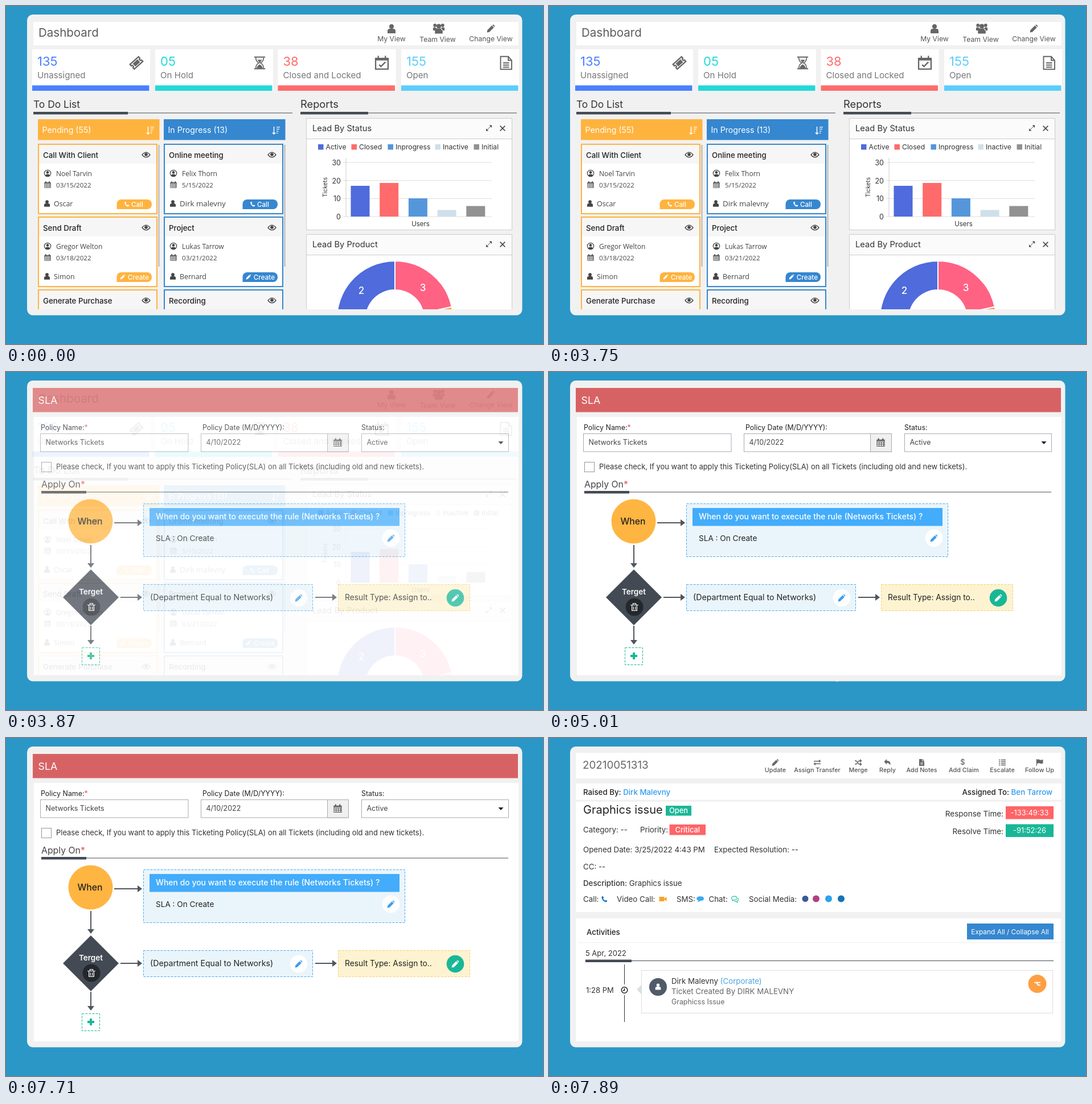
These frames come from a looping animation (943x594 px, 8 s). An HTML page:

```html
<!DOCTYPE html>
<html lang="en">
<head>
<meta charset="utf-8">
<title>Help desk tour</title>
<style>
html, body { margin: 0; width: 100%; height: 100%; overflow: hidden; background: #2a97c7; }
svg { display: block; width: 943px; height: 594px; font-family: Inter, sans-serif; }
text { white-space: pre; }
</style>
</head>
<body>
<svg id="stage" viewBox="0 0 943 594"></svg>
<script>
const DARK = '#434a54', ORANGE = '#ffb33f', BLUE = '#3587d0', GREEN = '#19b797', RED = '#ff6467', GREY = '#666';

const rect = (x, y, w, h, fill, more = '') => `<rect x="${x}" y="${y}" width="${w}" height="${h}" fill="${fill}" ${more}/>`;
const box = (x, y, w, h, fill, stroke, more = '') => rect(x, y, w, h, fill, `stroke="${stroke}" ${more}`);
const circle = (x, y, r, fill) => `<circle cx="${x}" cy="${y}" r="${r}" fill="${fill}"/>`;
const path = (d, fill, more = '') => `<path d="${d}" fill="${fill}" ${more}/>`;
const line = (d, color, width = 1) => path(d, 'none', `stroke="${color}" stroke-width="${width}"`);
const text = (x, y, size, str, fill = '#333', weight = 400, anchor = 'start', more = '') =>
  `<text x="${x}" y="${y}" font-size="${size}" fill="${fill}" font-weight="${weight}" text-anchor="${anchor}" ${more}>${str}</text>`;
const mid = (x, y, size, str, fill, weight) => text(x, y, size, str, fill, weight, 'middle');
const tint = (str, fill) => `<tspan fill="${fill}">${str}</tspan>`;

// Icons live in a box from -8 to 8; F fills, S strokes in the current colour.
const F = d => path(d, 'currentColor');
const S = (d, w = 1.5) => line(d, 'currentColor', w);
const dot = (x, y, r) => circle(x, y, r, 'currentColor');
const ICONS = {
  user: dot(0, -4, 4) + F('M-7 8V4Q-7 0-3 0H3Q7 0 7 4V8Z'),
  face: S('M-7 0A7 7 0 1 1 7 0A7 7 0 1 1-7 0') + dot(0, -2, 2.8) + F('M-5 5Q-4 1 0 2Q4 1 5 5Q0 9-5 5'),
  team: dot(-6, -5, 2.6) + dot(6, -5, 2.6) + dot(0, -3.5, 3.6) +
    F('M-9 3V0Q-9-2-6-2L-3 0L-5 3ZM9 3V0Q9-2 6-2L3 0L5 3ZM-6 8V4Q-6 0-2 0H2Q6 0 6 4V8Z'),
  pencil: F('M-8 8L-7 3L2-6L6-2L-3 7ZM3-7L5-8L8-5L7-3Z'),
  eye: S('M-8 0Q0-10 8 0Q0 10-8 0Z') + dot(0, -.5, 3.2),
  cal: S('M-7-5H7V7H-7ZM-7-1H7M-7 3H7M-3-2V7M1-2V7M5-2V7', 1.1) + S('M-7-4H7M-4-8V-4M4-8V-4', 2),
  check: S('M-7-5H7V7H-7ZM-4-8V-4M4-8V-4M-3 2L-1 4L4-1') + S('M-7-4H7', 2.5),
  phone: F('M-7-5L-4-8L-1-3L-3-1Q-1 3 2 4L4 2L8 5L5 8Q-5 7-7-5'),
  sort: S('M-4-8V7M-7 4L-4 7L-1 4M1-7H8M1-3H7M1 1H5M1 5H4', 1.7),
  ticket: `<g transform="rotate(-42)">${S('M-9-5H9V-2A2 2 0 0 0 9 2V5H-9V2A2 2 0 0 0-9-2Z', 2)}${F('M-5-3H5V3H-5Z')}</g>`,
  glass: S('M-7-7.5H7M-7 7.5H7') + S('M-5-7Q-5-2-1 0Q-5 2-5 7M5-7Q5-2 1 0Q5 2 5 7', 1.2) + F('M-3-4H3L0 0ZM-4 7Q-3 3 0 2Q3 3 4 7'),
  doc: S('M-6-7.5H3L7-3V7.5H-6ZM3-7V-3H7M-3 0H4M-3 2.5H4M-3 5H4', 1.3),
  note: F('M-6-8H1V-3H6V8H-6ZM2-8L6-4H2Z') + line('M-3 1H3M-3 4H3', '#fff', 1.3),
  expand: S('M-5 5L5-5', 1.5) + F('M-8 8V1L-1 8ZM8-8V-1L1-8Z'),
  close: S('M-7-7L7 7M7-7L-7 7', 2.3),
  trash: S('M-5-4V7H5V-4M-8-4H8M-3-5V-7H3V-5M-2-1V5M2-1V5', 1.4),
  swap: S('M-8-3H5M8 3H-5', 2) + F('M4-7L9-3L4 0ZM-4 0L-9 3L-4 7Z'),
  merge: S('M-8-4H-5L2 4H5M-8 4H-5L2-4H5', 2.2) + F('M4-8L9-4L4 0ZM4 0L9 4L4 8Z'),
  reply: F('M-8-2L-2-8V-4Q9-4 6 7Q5 1-2 1V5Z'),
  list: S('M-8-6H-5M-3-6H8M-8-2H-5M-3-2H8M-8 2H-5M-3 2H8M-8 6H-5M-3 6H8', 2.2),
  flag: S('M-7-8V8', 1.6) + F('M-6-7Q-2-8 1-6Q4-5 8-7V2Q4 4 1 2Q-2 1-6 3Z'),
  video: F('M-8-5H3V-1L8-5V5L3 1V5H-8Z'),
  bubble: F('M-8-1Q-7-6 0-6Q8-6 8-1Q8 4 0 4L-6 7L-4 3Q-8 2-8-1'),
  chat: S('M-7-2Q-6-6-1-6Q5-6 5-2Q5 2-1 2L-5 4L-4 1Q-7 0-7-2M7-2Q10 3 5 4L6 7L2 5H-1', 1.4),
  clock: S('M-7 0A7 7 0 1 1 7 0A7 7 0 1 1-7 0M0-4V1H-4', 2),
  branch: S('M-7-3H7M-2-3L2 3H7', 2.6)
};
const icon = (name, x, y, size, color = GREY) =>
  `<g transform="translate(${x} ${y}) scale(${size / 16})" color="${color}">${ICONS[name]}</g>`;

const heading = (x, y, size, str, thick, end, lineY, color) =>
  text(x, y, size, str, color) + line(`M${x} ${lineY}H${end}`, DARK) + rect(x, lineY - 2, thick, 4.5, DARK);

function dashboard() {
  const tile = (x, count, label, color, name, iconX, iconSize) =>
    rect(x, 76, 207, 73, '#fff') + rect(x, 139.5, 205.5, 9.5, color) + text(x + 9, 105, 22, count, color) +
    text(x + 9, 127, 15.1, label, '#777') + icon(name, iconX, 100, iconSize);

  const card = (x, y, color, title, person, date, owner, action, ownerSize = 12.4) => {
    const small = (dx, dy, size, str) => text(x + dx, y + dy, size, str, '#444', 400, 'start', 'font-family="Open Sans, sans-serif"');
    const right = x + 199, isCall = action == 'Call';
    return box(x, y + 1, 208, 122, '#fff', color, 'stroke-width="2"') + rect(x + 1, y + 2, 206, 33, '#f6f6f6') +
      text(x + 8, y + 25, 13.3, title, '#222', 500) + icon('eye', x + 189, y + 19.5, 14, '#444') +
      icon('face', x + 16, y + 52, 13, '#444') + small(31, 57, 12, person) +
      icon('cal', x + 16, y + 72, 12, '#444') + small(31, 77, 11.6, date) +
      icon('user', x + 15, y + 105, 11.5, '#444') + small(27, 110, ownerSize, owner) +
      path(`M${right - 8} ${y + 98}a8 8 0 0 1 8 8v1a8 8 0 0 1-8 8h-53.5v-9a8 8 0 0 1 8-8z`, color) +
      icon(isCall ? 'phone' : 'pencil', right - (isCall ? 44 : 51), y + 106, 9, '#fff') +
      text(right - (isCall ? 15 : 5), y + 110.5, 11.7, action, '#fff', 500, 'end');
  };

  const column = (x, color, title, cards) =>
    rect(x - 1, 199, 213.5, 36.5, color) + text(x + 6.5, 223, 14.2, title, '#fff') + icon('sort', x + 196, 219, 14, '#fff') +
    cards.map((c, i) => card(x, 242 + 128 * i, color, ...c)).join('') +
    line(`M${x + 211.5} 244V458`, '#b4b4b4', 2);

  const panel = (y, height, title) =>
    box(527.5, y, 361, height, '#fff', '#ccc') + rect(528, y + .5, 360, 35, '#fbfbfb') + line(`M527 ${y + 36}H889`, '#ccc') +
    text(538, y + 22.5, 14.7, title) + icon('expand', 848, y + 17, 10, '#444') + icon('close', 872, y + 17.5, 10, '#444');

  const series = [
    ['Active', 548, '#4f6bdc', 54], ['Closed', 606.5, '#ff6b6b', 59], ['Inprogress', 670.5, '#5596db', 32],
    ['Inactive', 753.5, '#cfe0ea', 11.5], ['Initial', 821.5, '#929292', 18.5]];
  const legend = ([name, x, color]) => rect(x, 243, 9.5, 9.5, color) + text(x + 13.5, 252, 12.2, name);
  const bar = ([, , color, height], i) => rect(605.5 + 50.7 * i, 370 - height, 33, height, color);

  const polar = (r, deg) => {
    const a = deg * Math.PI / 180;
    return `${683 + r * Math.sin(a)} ${550 - r * Math.cos(a)}`;
  };
  const slice = (from, to, color) => path(
    `M${polar(102, from)}A102 102 0 0 1 ${polar(102, to)}L${polar(51, to)}A51 51 0 0 0 ${polar(51, from)}Z`,
    color, 'stroke="#fff" stroke-width="2"');

  return rect(48, 28, 852, 41, '#fff') + text(57, 53.5, 20.5, 'Dashboard', '#5c5c5c') +
    icon('user', 677, 40, 16) + mid(677, 62, 12.2, 'My View', '#555') +
    icon('team', 760, 39.5, 18) + mid(758, 63, 12.2, 'Team View', '#555') +
    icon('pencil', 851.5, 39.5, 14) + mid(851.5, 62, 12.2, 'Change View', '#555') +
    tile(46, '135', 'Unassigned', '#4a80ff', 'ticket', 229, 18) + tile(262, '05', 'On Hold', '#25d8d8', 'glass', 445.5, 22) +
    tile(477.5, '38', 'Closed and Locked', '#ff6b6b', 'check', 660, 25) + tile(694, '155', 'Open', '#5ccdfc', 'doc', 877.5, 24) +
    heading(48, 178.5, 17.4, 'To Do List', 166, 503, 188) + heading(517, 178.5, 18.3, 'Reports', 119, 897, 188) +
    column(57, ORANGE, 'Pending (55)', [
      ['Call With Client', 'Noel Tarvin', '03/15/2022', 'Oscar', 'Call'],
      ['Send Draft', 'Gregor Welton', '03/18/2022', 'Simon', 'Create'],
      ['Generate Purchase', '', '', '', '']]) +
    column(278, BLUE, 'In Progress (13)', [
      ['Online meeting', 'Felix Thorn', '5/15/2022', 'Dirk malevny', 'Call', 13.3],
      ['Project', 'Lukas Tarrow', '03/21/2022', 'Bernard', 'Create'],
      ['Recording', '', '', '', '']]) +
    panel(197.5, 196, 'Lead By Status') + series.map(legend).join('') +
    [30, 20, 10, 0].map((n, i) => line(`M592 ${275 + 31.7 * i}H853`, '#ddd') + text(588, 280 + 31.7 * i, 12.5, n, '#333', 400, 'end')).join('') +
    line('M597 267V370', '#ccc') + series.map(bar).join('') + mid(728, 387, 11.5, 'Users') +
    text(0, 0, 10.3, 'Tickets', '#333', 400, 'middle', 'transform="translate(563.5 318.5) rotate(-90)"') +
    panel(401.5, 200, 'Lead By Product') +
    slice(-100, 0, '#4f6bdc') + slice(0, 78, '#ff6283') + slice(78, 110, '#ff9f43') +
    mid(624, 506, 17, '2', '#fff', 500) + mid(732, 501, 17, '3', '#fff', 500);
}

function policy() {
  const field = (x, width, labelX, label, value) =>
    text(labelX, 101.5, 12.4, label, '#222') + box(x, 108.5, width, 31.5, '#fff', '#a5abb3') + text(x + 9, 128, 12.5, value, '#444');
  const arrow = (x, y, length, turn = 0) => `<g transform="translate(${x} ${y}) rotate(${turn})">` +
    line(`M0 0H${length - 6}`, '#50565e', 2) + path(`M${length - 8}-6V6L${length} 0Z`, '#50565e') + '</g>';
  const dashed = (x, y, w, h, fill, stroke) => box(x, y, w, h, fill, stroke, 'stroke-dasharray="4 2"');
  const edit = (x, y, fill, color) => circle(x, y, 15.3, fill) + icon('pencil', x, y, 13, color);
  const star = tint('*', '#e0555a');

  return rect(47, 28, 852, 42.5, '#d76264') + text(56.5, 56, 17.8, 'SLA', '#fff') + rect(49, 79, 851, 454, '#fff') +
    field(60.5, 259.5, 61, 'Policy Name:' + star, 'Networks Tickets') +
    field(342.5, 259, 345, 'Policy Date (M/D/YYYY):', '4/10/2022') +
    box(564.5, 108.5, 37, 31.5, '#f0f0f0', '#a5abb3') + icon('cal', 582.5, 124, 15, '#555') +
    field(624.5, 258, 624, 'Status:', 'Active') + path('M864.5 122H873.5L869 127Z', '#222') +
    box(62.5, 158.5, 17, 17, '#fff', '#8d97a3') +
    text(88, 171, 12.93, 'Please check, If you want to apply this Ticketing Policy(SLA) on all Tickets (including old and new tickets).') +
    heading(62, 203, 15.8, 'Apply On' + star, 79, 882, 211, '#444') +
    circle(148.5, 262.5, 39, '#ffb541') + mid(147.5, 268, 15.8, 'When', '#222', 500) +
    arrow(190, 265, 49) + arrow(149, 304, 40, 90) + arrow(201, 396, 38) + arrow(149, 446, 33, 90) + arrow(543, 396, 38) +
    path('M149 347L198 396L149 445L100 396Z', DARK) + mid(149, 391, 13.5, 'Terget', '#fff', 600) +
    circle(150, 413, 15.5, '#23282d') + icon('trash', 150, 413, 14, '#fff') +
    dashed(133.5, 484.5, 31, 30, '#fff', GREEN) + line('M149 493V505M143 499H155', GREEN, 4) +
    dashed(241.5, 231.5, 459, 93, '#eaf5fb', '#4aacee') + rect(252, 239, 439, 31.5, '#43acfb') +
    text(263, 259, 13.95, 'When do you want to execute the rule (Networks Tickets) ?', '#fff', 500) +
    text(263, 297, 13.6, 'SLA : On Create', '#222') + edit(676, 292, '#fff', '#3b9ff0') +
    dashed(241.5, 373.5, 297, 46, '#eaf5fb', '#4aacee') +
    text(253, 401, 14.2, '(Department Equal to Networks)', '#222') + edit(514, 397, '#fff', '#3b9ff0') +
    dashed(583.5, 373.5, 231, 46, '#fdf3d0', '#f5cf70') +
    text(595, 401, 13.8, 'Result Type: Assign to..', '#222') + edit(789, 397, GREEN, '#fff');
}

function ticket() {
  const tool = ([label, x, name]) => mid(x, 60, 10.8, label, '#555', 500) +
    (name ? icon(name, x, 43, 12) : mid(x - 2, 47, 13, '$', GREY, 500));
  const badge = (x, y, w, h, fill, str, weight) => rect(x, y, w, h, fill) + mid(x + w / 2, y + h / 2 + 4.6, 12.9, str, '#fff', weight);
  const body = (x, y, str) => text(x, y, 13.3, str);

  return rect(47, 26, 852, 45, '#fff') + text(59, 54, 18.8, '20210051313', GREY) +
    [['Update', 397.5, 'pencil'], ['Assign Transfer', 471, 'swap'], ['Merge', 543, 'merge'], ['Reply', 594.5, 'reply'],
      ['Add Notes', 654.5, 'note'], ['Add Claim', 728.5], ['Escalate', 796, 'list'], ['Follow Up', 861.5, 'flag']].map(tool).join('') +
    rect(47, 80, 853, 28.5, '#fff') + text(60, 100, 13.3, 'Raised By: ' + tint('Dirk Malevny', '#2e9af0'), '#222', 500) +
    text(884, 100, 13.3, 'Assigned To: ' + tint('Ben Tarrow', '#2e9af0'), '#222', 500, 'end') +
    rect(47, 112, 852, 194, '#fff') + text(60, 133, 20, 'Graphics issue', '#222') + badge(205, 119, 45, 17.5, GREEN, 'Open', 500) +
    text(798, 137.5, 13.5, 'Response Time:', '#333', 400, 'end') + badge(802, 120, 84, 22.5, RED, '-133:49:33') +
    text(798, 169, 13.5, 'Resolve Time:', '#333', 400, 'end') + badge(802, 151.5, 84, 22.5, GREEN, '-91:52:26') +
    body(60, 166, 'Category: --') + body(160, 166, 'Priority:') + badge(211.5, 152, 63.5, 18.5, RED, 'Critical', 500) +
    body(60, 201, 'Opened Date: 3/25/2022 4:43 PM') + body(290, 201, 'Expected Resolution: --') + body(60, 231, 'CC: --') +
    body(60, 260, '<tspan font-weight="500">Description:</tspan> Graphics issue') +
    body(60, 287.5, 'Call:') + icon('phone', 97, 283, 11, '#1173c7') +
    body(119, 287.5, 'Video Call:') + icon('video', 200, 283, 13, '#f5a52c') +
    body(224, 287.5, 'SMS:') + icon('bubble', 265.5, 283, 13, '#3fa9f5') +
    body(280.5, 287.5, 'Chat:') + icon('chat', 326, 283, 13, '#2cc3a5') + body(351, 287.5, 'Social Media:') +
    circle(450, 282.5, 5.5, '#3b5998') + circle(469, 282.5, 6, '#b0407f') + circle(491, 282.5, 6, '#2ba3ee') + circle(513, 282.5, 6, '#1473b8') +
    rect(47, 317, 852, 216, '#fff') + text(66, 346, 13.3, 'Activities', '#222', 500) +
    rect(734, 326, 152, 28, BLUE) + mid(809.5, 344.5, 11.9, 'Expand All / Collapse All', '#fff') + line('M52 359.5H899', '#eee') +
    heading(64, 383, 13, '5 Apr, 2022', 81, 886, 391.5) +
    line('M132.5 398V433M132.5 452V499', '#333') + icon('clock', 132.5, 443, 12, '#222') + text(65, 448, 13, '1:28 PM') +
    box(162.5, 408.5, 722, 75, '#fff', '#ddd') + path('M154 442L162 434V450Z', '#d9e0e4') +
    circle(191.5, 437.5, 15.5, '#505a68') + icon('user', 191.5, 437, 11, '#fff') +
    body(215, 432, 'Dirk Malevny ' + tint('(Corporate)', '#4aa3df')) +
    text(215, 450, 13.3, 'Ticket Created By DIRK MALEVNY', GREY) + text(215, 468, 12.4, 'Graphicss Issue', GREY) +
    circle(857.5, 432, 16, '#ff9f43') + icon('branch', 857.5, 432, 12, '#fff');
}

const scene = (id, content) => `<g id="${id}" clip-path="url(#view)">${rect(42, 22, 860, 511, '#f1f1f1')}${content}</g>`;
const captions = ['Customizable Display', 'SLA Rules and Policy for All Tickets'];
document.getElementById('stage').innerHTML =
  `<clipPath id="view">${rect(42, 22, 860, 511, '#000')}</clipPath>` + rect(0, 0, 943, 594, '#2a97c7') +
  text(473, 582, 28.4, '', '#fff', 500, 'middle', 'id="caption"') + rect(37, 15, 869.5, 528.5, '#f1f1f1', 'rx="10"') +
  rect(47, 28, 853, 505, '#fff') +
  scene('dashboard', dashboard()) + scene('policy', policy()) + scene('ticket', ticket());

const [caption, ...views] = ['caption', 'dashboard', 'policy', 'ticket'].map(id => document.getElementById(id));
const smooth = p => p * p * (3 - 2 * p);
// Progress in held steps, from 0 at start to 1 after the last step.
const progress = (t, start, hold, steps) =>
  Math.min(1, Math.max(0, Math.floor((t - start) / hold) / steps));

function draw(now) {
  const t = now % 8000;
  const second = t >= 5010;
  const start = second ? 5010 : 1050;
  caption.textContent = t >= start && t < start + 2700 ? captions[+second] : '';
  caption.setAttribute('y', 582 - 44 * (1 - smooth(progress(t, start, 100, 7))));

  // Each view fades out over white while the next one fades in above it.
  const toPolicy = progress(t, 3750, 30, 6);
  const toTicket = progress(t, 7710, 30, 6);
  const opacities = [1 - toPolicy, smooth(toPolicy) * (1 - toTicket), smooth(toTicket)];
  views.forEach((view, i) => view.setAttribute('opacity', opacities[i]));
  requestAnimationFrame(() => draw(performance.now()));
}
draw(performance.now());
</script>
</body>
</html>
```
